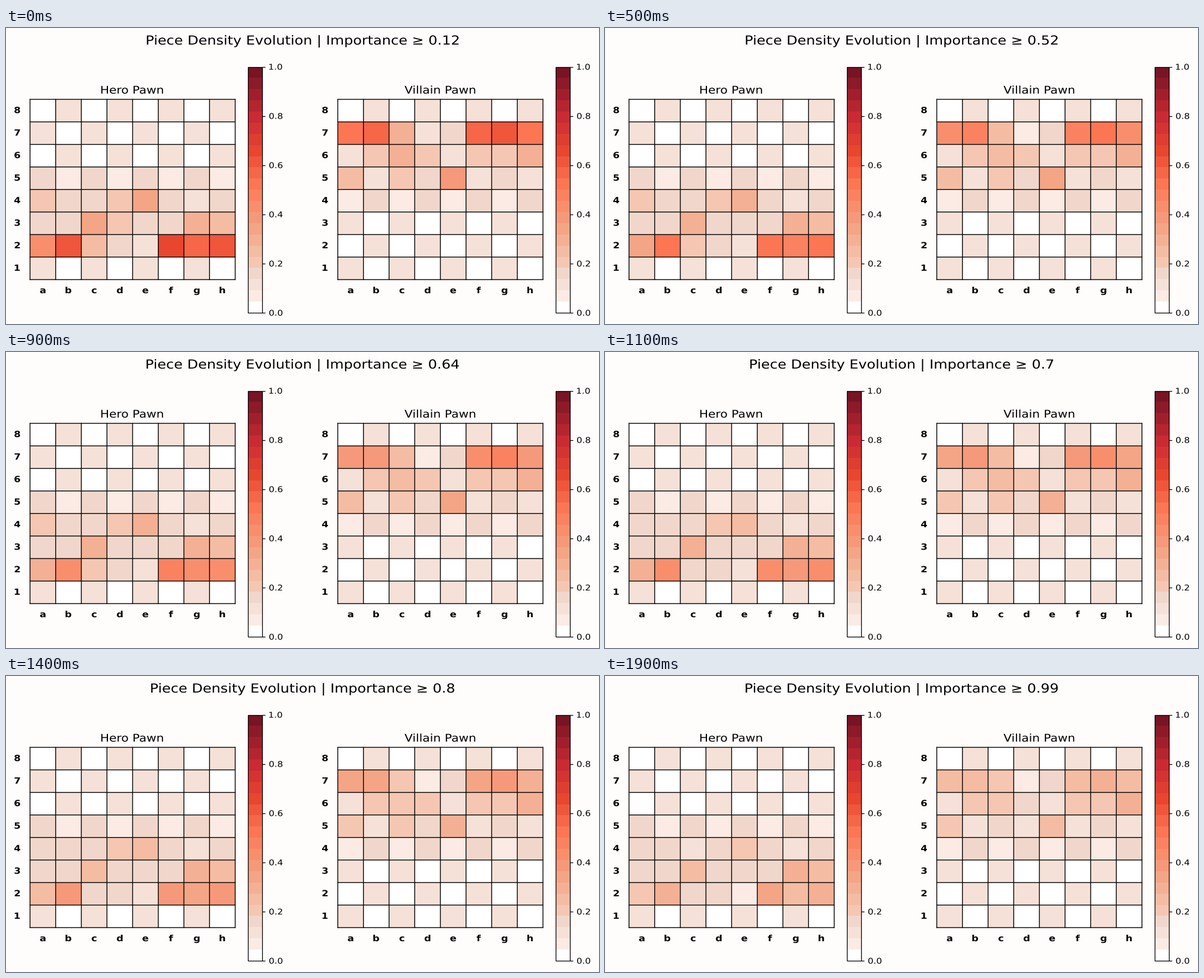
A matplotlib script that plays this animation: 1000 by 500 pixels, repeating every 2 s.

```python
import numpy as np
import matplotlib.pyplot as plt
from matplotlib.animation import FuncAnimation
from matplotlib.colors import LinearSegmentedColormap
from matplotlib.patches import PathPatch, Rectangle
from matplotlib.textpath import TextPath
from matplotlib.transforms import Affine2D

W, H, DPI = 1000, 500, 100
FRAMES, INTERVAL = 20, 100
SQUASH = 0.88  # the whole picture is flatter than it is wide
BOARD_TOP, BOARD_BOTTOM, BOARD_W = 120.5, 425, 346
BAR_TOP, BAR_BOTTOM, BAR_W, BAR_GAP = 65.5, 481, 24, 368

LEVELS = 22
KEY_COLOURS = {0: "#ffffff", 1: "#fbebe4", 3: "#f1d7cb", 4: "#f5c7b3",
               7: "#f4a586", 11: "#fd7654", 14: "#e8462f", 17: "#ca2a33",
               21: "#781424"}
CMAP = LinearSegmentedColormap.from_list(
    "density", [(k / (LEVELS - 1), c) for k, c in KEY_COLOURS.items()], N=LEVELS)

FILES = "abcdefgh"
FADE = 0.62  # share of a peak lost over the loop

# Peaks above the board tint: the home rank by file, then advanced squares.
HERO = dict(x=40, name="Hero Pawn", home=2,
            home_peaks=[8, 11, 4, 1.4, 1, 12, 11.4, 11],
            advanced={"b3": 1.4, "c3": 4.4, "d3": 1.9, "f3": 1.4, "g3": 3,
                      "h3": 2.6, "a4": 2.4, "c4": 1, "d4": 1.2, "e4": 5.4})
VILLAIN = dict(x=559, name="Villain Pawn", home=7,
               home_peaks=[9, 11, 4.4, 0.6, 1.4, 11.4, 11.4, 10.3],
               advanced={"b6": 1.45, "c6": 4.4, "d6": 1.3, "f6": 1.45, "g6": 2,
                         "h6": 3.4, "a5": 2.4, "c5": 1.3, "d5": 1, "e5": 5.4})

fig = plt.figure(figsize=(W / DPI, H / DPI), dpi=DPI, facecolor="#fffdfc")
ax = fig.add_axes([0, 0, 1, 1])
ax.axis("off")


def text_path(text, x, baseline, size, weight="normal", align="center"):
    path = TextPath((0, 0), text, size=size,
                    prop={"family": "DejaVu Sans", "weight": weight})
    box = path.get_extents()
    anchor = box.x0 if align == "left" else (box.x0 + box.x1) / 2
    move = Affine2D().translate(-anchor, 0).scale(1, -SQUASH)
    return move.translate(x, baseline).transform_path(path)


def add_text(*args, **kwargs):
    return ax.add_patch(PathPatch(text_path(*args, **kwargs),
                                  facecolor="black", linewidth=0))


def levels_at(side, t):
    """Colour level of every square, rank 1 first; t runs from 0 to 1."""
    file, rank = np.meshgrid(np.arange(8), np.arange(1, 9))
    dark = (file + rank) % 2
    steps = (rank - side["home"]) * (1 if side["home"] == 2 else -1)
    floor = np.select([steps == 0, (steps == 1) | (steps == 2), steps == 3],
                      [1 + dark, 2 + dark, 1 + 2 * dark], 2 * dark)
    peak = np.zeros((8, 8))
    peak[side["home"] - 1] = side["home_peaks"]
    for (f, r), value in side["advanced"].items():
        peak[int(r) - 1, FILES.index(f)] = value
    # advanced pawns on the g and h files hold their ground
    fade = np.where((file >= 6) & (steps > 0), 0, FADE)
    return np.round(floor + peak * (1 - fade * t))


def heat_mesh(xs, ys, levels):
    return ax.pcolormesh(xs, ys, levels, cmap=CMAP,
                         vmin=-0.5, vmax=LEVELS - 0.5)


def add_board(side):
    x = side["x"]
    xs = np.linspace(x, x + BOARD_W, 9)
    ys = np.linspace(BOARD_BOTTOM, BOARD_TOP, 9)
    mesh = heat_mesh(xs, ys, levels_at(side, 0))
    grid = dict(colors="black", linewidth=1, snap=False, capstyle="projecting")
    ax.vlines(xs + 0.5, BOARD_TOP, BOARD_BOTTOM, **grid)
    ax.hlines(ys, x + 0.5, x + BOARD_W + 0.5, **grid)
    add_text(side["name"], x + BOARD_W / 2 - 0.3, 110.8, 20.3)
    for i, f in enumerate(FILES):
        add_text(f, (xs[i] + xs[i + 1]) / 2 + 0.4, 448, 16.4, "bold")
        add_text(str(i + 1), x - 21, (ys[i] + ys[i + 1]) / 2 + 4.2, 16.4, "bold")
    return mesh


def add_colorbar(x):
    ys = np.linspace(BAR_BOTTOM, BAR_TOP, LEVELS + 1)
    heat_mesh([x, x + BAR_W], ys, np.arange(LEVELS)[:, None])
    ax.add_patch(Rectangle((x, BAR_TOP), BAR_W, BAR_BOTTOM - BAR_TOP,
                           fill=False, ec="black", lw=0.9))
    for v in np.linspace(0, 1, 6):
        y = BAR_BOTTOM + (BAR_TOP - BAR_BOTTOM) * v
        ax.plot([x + BAR_W, x + BAR_W + 5], [y, y], color="black", lw=0.9,
                solid_capstyle="butt")
        add_text(f"{v:.1f}", x + BAR_W + 12, y + 4.9, 15.2, align="left")


def title_path(i):
    threshold = np.interp(i, [0, 2, 5, 11, 14, 19],
                          [0.12, 0.4, 0.52, 0.7, 0.8, 0.99])
    text = f"Piece Density Evolution | Importance ≥ {round(threshold, 2):g}"
    return text_path(text, 500.4, 28, 23.95)


boards = []
for side in (HERO, VILLAIN):
    boards.append((add_board(side), side))
    add_colorbar(side["x"] + BAR_GAP)
title = ax.add_patch(PathPatch(title_path(0), facecolor="black", linewidth=0))
ax.set_xlim(0, W)
ax.set_ylim(H, 0)


def update(i):
    t = (i / (FRAMES - 1)) ** 0.8
    for mesh, side in boards:
        mesh.set_array(levels_at(side, t))
    title.set_path(title_path(i))
    return [title] + [mesh for mesh, _ in boards]


anim = FuncAnimation(fig, update, frames=FRAMES, interval=INTERVAL,
                     repeat=True, repeat_delay=0, blit=False)
plt.show()
```
